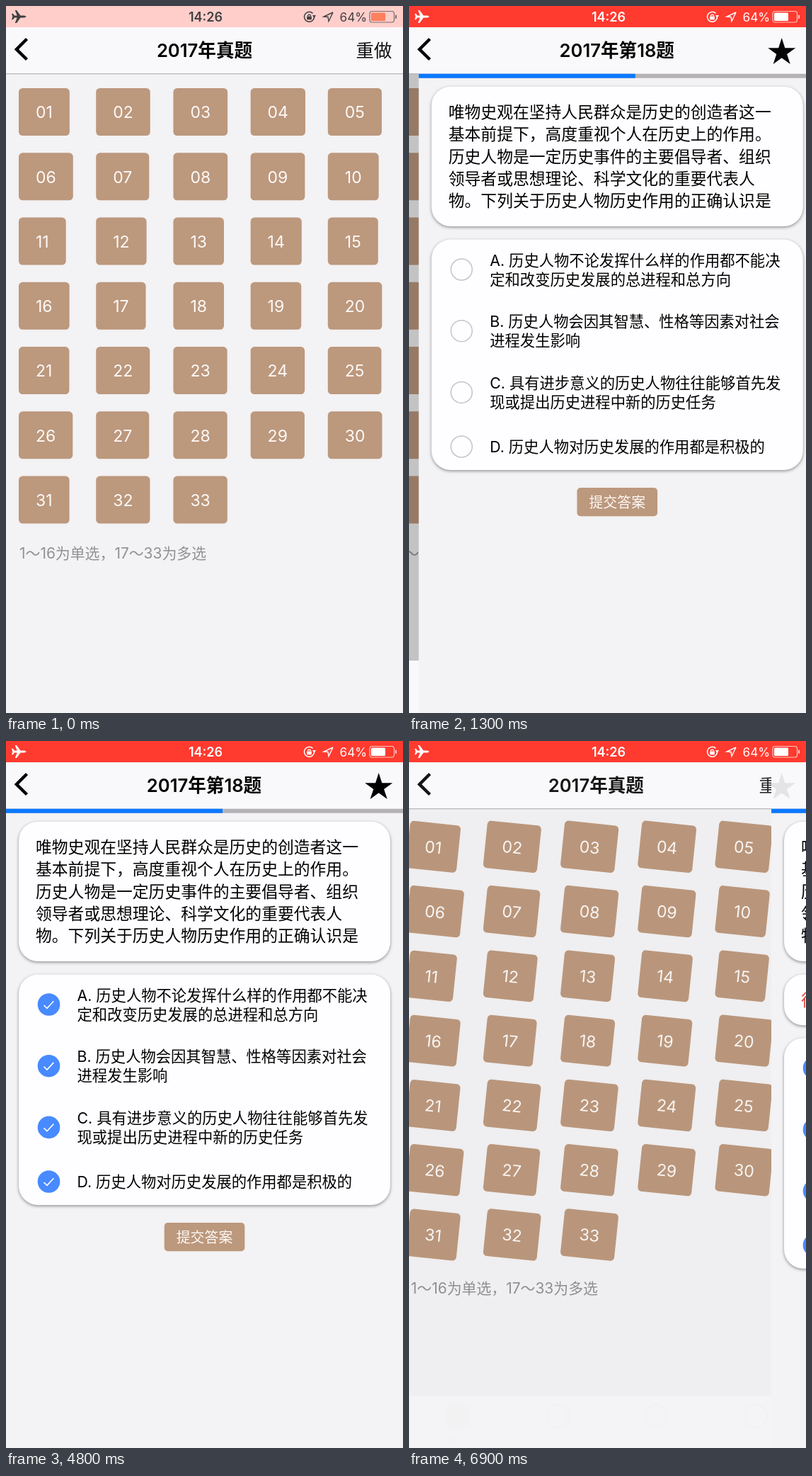
An HTML page with a canvas that plays this animation: 561x998 px, repeating every 7000 ms.

```html
<!DOCTYPE html>
<html lang="zh-CN">
<head>
<meta charset="utf-8">
<title>真题练习</title>
<style>
html, body { margin: 0; width: 100%; height: 100%; overflow: hidden; background: #f3f2f4; }
canvas { display: block; }
</style>
</head>
<body>
<canvas id="stage" width="561" height="998"></canvas>
<script>
const W = 561, H = 998, LOOP = 7000, STEP = 100, TOP = 95.7;
const ctx = document.getElementById('stage').getContext('2d');
const FONT = 'Inter, "Noto Sans CJK SC", "Noto Sans CJK", sans-serif';
const PAGE = '#f3f2f4', HEADER = '#f9f8fa', CARD = '#fefdff', TAN = '#bc987d';

const PUSH = 981, POP = 6682, SLIDE = 500, SWING = 6654, RESULT = 5100;
const CHECKS = [3400, 3500, 3800, 4800];

const QUESTION = [
  '唯物史观在坚持人民群众是历史的创造者这一',
  '基本前提下，高度重视个人在历史上的作用。',
  '历史人物是一定历史事件的主要倡导者、组织',
  '领导者或思想理论、科学文化的重要代表人',
  '物。下列关于历史人物历史作用的正确认识是'
];
const OPTIONS = [
  { y: 372, lines: ['A. 历史人物不论发挥什么样的作用都不能决', '定和改变历史发展的总进程和总方向'] },
  { y: 458.7, lines: ['B. 历史人物会因其智慧、性格等因素对社会', '进程发生影响'] },
  { y: 545.4, lines: ['C. 具有进步意义的历史人物往往能够首先发', '现或提出历史进程中新的历史任务'] },
  { y: 622, lines: ['D. 历史人物对历史发展的作用都是积极的'] }
];

const clamp = v => Math.max(0, Math.min(1, v));
const mix = (a, b, k) => `rgb(${a.map((v, i) => Math.round(v + (b[i] - v) * k))})`;

// CSS-style cubic-bezier easing, solved by bisection
function bezier(x1, y1, x2, y2) {
  const at = (a, b, u) => 3 * (1 - u) * (1 - u) * u * a + 3 * (1 - u) * u * u * b + u * u * u;
  return x => {
    if (x <= 0 || x >= 1) return clamp(x);
    let lo = 0, hi = 1;
    for (let i = 0; i < 30; i++) {
      const mid = (lo + hi) / 2;
      if (at(x1, x2, mid) < x) lo = mid; else hi = mid;
    }
    return at(y1, y2, lo);
  };
}
const slideEase = bezier(.36, .66, .04, 1);
const ease = bezier(.25, .1, .25, 1);

function swingAngle(t) {
  if (t < SWING) return 0;
  const keys = [0, 15, -10, 5, -5, 0];
  const pos = (t - SWING) / 200, i = Math.floor(pos);
  if (i >= 5) return 0;
  return (keys[i] + (keys[i + 1] - keys[i]) * ease(pos - i)) * Math.PI / 180;
}

function text(str, x, y, size, color = '#000', weight = 400, align = 'left') {
  ctx.font = `${weight} ${size}px ${FONT}`;
  ctx.textAlign = align;
  ctx.fillStyle = color;
  ctx.fillText(str, x, y);
}

function rect(x, y, w, h, color) {
  ctx.fillStyle = color;
  ctx.fillRect(x, y, w, h);
}

function roundRect(x, y, w, h, r, color) {
  ctx.beginPath();
  ctx.roundRect(x, y, w, h, r);
  ctx.fillStyle = color;
  ctx.fill();
}

function line(points, width, color) {
  ctx.beginPath();
  points.forEach(([x, y]) => ctx.lineTo(x, y));
  ctx.lineWidth = width;
  ctx.strokeStyle = color;
  ctx.stroke();
}

function polygon(points, color) {
  ctx.beginPath();
  points.forEach(([x, y]) => ctx.lineTo(x, y));
  ctx.closePath();
  ctx.fillStyle = color;
  ctx.fill();
}

function layer(alpha, draw) {
  ctx.save();
  ctx.globalAlpha *= alpha;
  draw();
  ctx.restore();
}

function card(y, h) {
  ctx.save();
  ctx.shadowColor = 'rgba(0,0,0,.42)';
  ctx.shadowBlur = 4;
  ctx.shadowOffsetY = 1.5;
  roundRect(18, y, 525, h, 27, CARD);
  ctx.restore();
}

function statusBar(t) {
  const k = clamp(.25 + .75 * t / 500);
  const ink = mix([0, 0, 0], [255, 255, 255], k);
  rect(0, 0, W, 30, mix([255, 255, 255], [255, 58, 47], k));

  // airplane
  const half = [[29, 15], [26, 13.5], [20.5, 13.4], [15, 6], [12.7, 6], [15.7, 13.4], [12, 13.6], [9.8, 10.7], [8, 10.7], [9.3, 15]];
  polygon([...half, ...half.slice().reverse().map(([x, y]) => [x, 30 - y])], ink);

  text('14:26', 282, 21.5, 18, ink, 600, 'center');

  // rotation lock
  ctx.beginPath();
  ctx.arc(428.5, 15.3, 7, -.2, 5.5);
  ctx.lineWidth = 1.5;
  ctx.strokeStyle = ink;
  ctx.stroke();
  polygon([[433, 13], [438, 13], [435.5, 17]], ink);
  rect(425.2, 14.5, 6.6, 4.8, ink);
  ctx.beginPath();
  ctx.arc(428.5, 14.3, 2.1, Math.PI, 0);
  ctx.lineWidth = 1.2;
  ctx.stroke();

  // location arrow
  line([[462, 9], [449, 15], [455, 15.5], [456, 21.5], [462, 9], [461, 10.5]], 1.4, ink);

  text('64%', 471.5, 21.5, 17.2, ink);

  // battery
  layer(.7, () => {
    ctx.beginPath();
    ctx.roundRect(514, 7.5, 34.5, 15.5, 3.5);
    ctx.lineWidth = 1.2;
    ctx.strokeStyle = ink;
    ctx.stroke();
    roundRect(550, 12.5, 2, 5.5, 1, ink);
  });
  roundRect(516, 9.5, 20, 11.5, 1.5, mix([255, 85, 40], [255, 255, 255], k));
}

function backArrow() {
  line([[29.5, 46.5], [14.8, 61.2], [29.5, 75.5]], 4.4, '#000');
}

function star() {
  const points = Array.from({ length: 10 }, (_, i) => {
    const r = i % 2 ? 7.8 : 20.5, a = i * Math.PI / 5 - Math.PI / 2;
    return [526.7 + r * Math.cos(a), 65.5 + r * Math.sin(a)];
  });
  polygon(points, '#000');
}

function numberButton(n, angle, pressed) {
  const x = 18 + (n - 1) % 5 * 109.2, y = 116 + Math.floor((n - 1) / 5) * 91.27;
  const label = String(n).padStart(2, '0');
  ctx.font = `400 23px ${FONT}`;
  const w = ctx.measureText(label).width + 48;
  ctx.save();
  ctx.translate(x + w / 2, y);
  ctx.rotate(angle);
  roundRect(-w / 2, 0, w, 67, 5.5, pressed ? '#ad8b73' : TAN);
  text(label, 0, 42.4, 23, '#fdf9f7', 400, 'center');
  ctx.restore();
}

function tabBar(popping) {
  rect(0, 924, W, 74, popping ? '#f4f3f5' : '#f9f8fa');
  layer(popping ? .01 : .1, () => {
    rect(53, 936, 34, 34, TAN);
    for (let i = 0; i < 3; i++) {
      rect(57, 943 + i * 9, 3, 2.5, '#fff');
      rect(63, 943 + i * 9, 20, 2.5, '#fff');
    }
    text('真题', 70, 992, 15, '#777', 400, 'center');
    [210, 349, 490].forEach(x => {
      ctx.beginPath();
      ctx.arc(x, 953, 16, 0, 7);
      ctx.lineWidth = 3;
      ctx.strokeStyle = '#777';
      ctx.stroke();
    });
  });
}

function listPage(t, p) {
  const shift = -.33 * W * p, angle = swingAngle(t);
  rect(0, 30, W, H - 30, PAGE);
  ctx.save();
  ctx.translate(shift, 0);
  for (let n = 1; n <= 33; n++) numberButton(n, angle, n === 18 && t >= 1000 && t < POP);
  text('1～16为单选，17～33为多选', 19, 780, 20.9, '#929094');
  ctx.restore();

  if (p > 0) {
    rect(0, 96, W, 828, `rgba(0,0,0,${.2 * p})`);
    tabBar(t >= POP);
  }

  rect(0, 30, W, 65, HEADER);
  rect(0, 95, W, 1.3, '#b9b8ba');
  layer(1 - p, () => {
    backArrow();
    text('2017年真题', 280.5 + shift, 71.5, 25.6, '#000', 600, 'center');
    text('重做', 494.5, 71.5, 25.4, '#111');
  });
}

function checkbox(y, checked) {
  ctx.beginPath();
  ctx.arc(60.5, y, checked ? 15.8 : 15, 0, 7);
  if (checked) {
    ctx.fillStyle = '#488aff';
    ctx.fill();
    line([[53.5, y + 1], [58, y + 5.3], [67.3, y - 4.8]], 1.6, '#fff');
  } else {
    ctx.lineWidth = 1.5;
    ctx.strokeStyle = '#c5c3c8';
    ctx.stroke();
  }
}

function questionBody(t) {
  rect(0, TOP, W, H - TOP, PAGE);
  rect(0, TOP, W, 6, '#b4b2b6');
  rect(0, TOP, 306, 6, '#0a78ff');

  card(113.7, 197.3);
  QUESTION.forEach((row, i) => text(row, 42, 157.8 + i * 31.4, 22.8));

  const answered = t >= RESULT;
  if (answered) {
    card(329.6, 71.6);
    text('很抱歉，答错了，正确答案是 A B C', 42, 373.6, 22.8, '#e0403a');
  }

  ctx.save();
  ctx.translate(0, answered ? 89.7 : 0);
  card(329.6, 325.4);
  OPTIONS.forEach(({ y, lines }, i) => {
    checkbox(y, t >= CHECKS[i]);
    const top = y + 8 - (lines.length - 1) * 13.5;
    lines.forEach((row, j) => text(row, 100.5, top + j * 27, 21.3));
  });
  roundRect(223.7, 680, 113.6, 40.3, 5, TAN);
  text('提交答案', 280.5, 707.5, 19.9, '#fdf9f7', 400, 'center');
  ctx.restore();
}

function questionPage(t, p) {
  ctx.save();
  ctx.translate(W * (1 - p), 0);
  rect(0, 30, W, 66, HEADER);
  questionBody(t);
  layer(p, () => text('2017年第18题', 280, 71.5, 25.6, '#000', 600, 'center'));
  ctx.restore();
  layer(p, () => {
    backArrow();
    star();
  });
}

function render(t) {
  const p = t < POP ? slideEase((t - PUSH) / SLIDE) : 1 - slideEase((t - POP) / SLIDE);
  if (p < 1) listPage(t, p);
  if (p > 0) questionPage(t, p);
  statusBar(t);
}

const start = performance.now();
function tick() {
  const elapsed = (performance.now() - start) % LOOP;
  render(Math.floor(elapsed / STEP) * STEP);
  requestAnimationFrame(tick);
}
tick();
</script>
</body>
</html>
```
